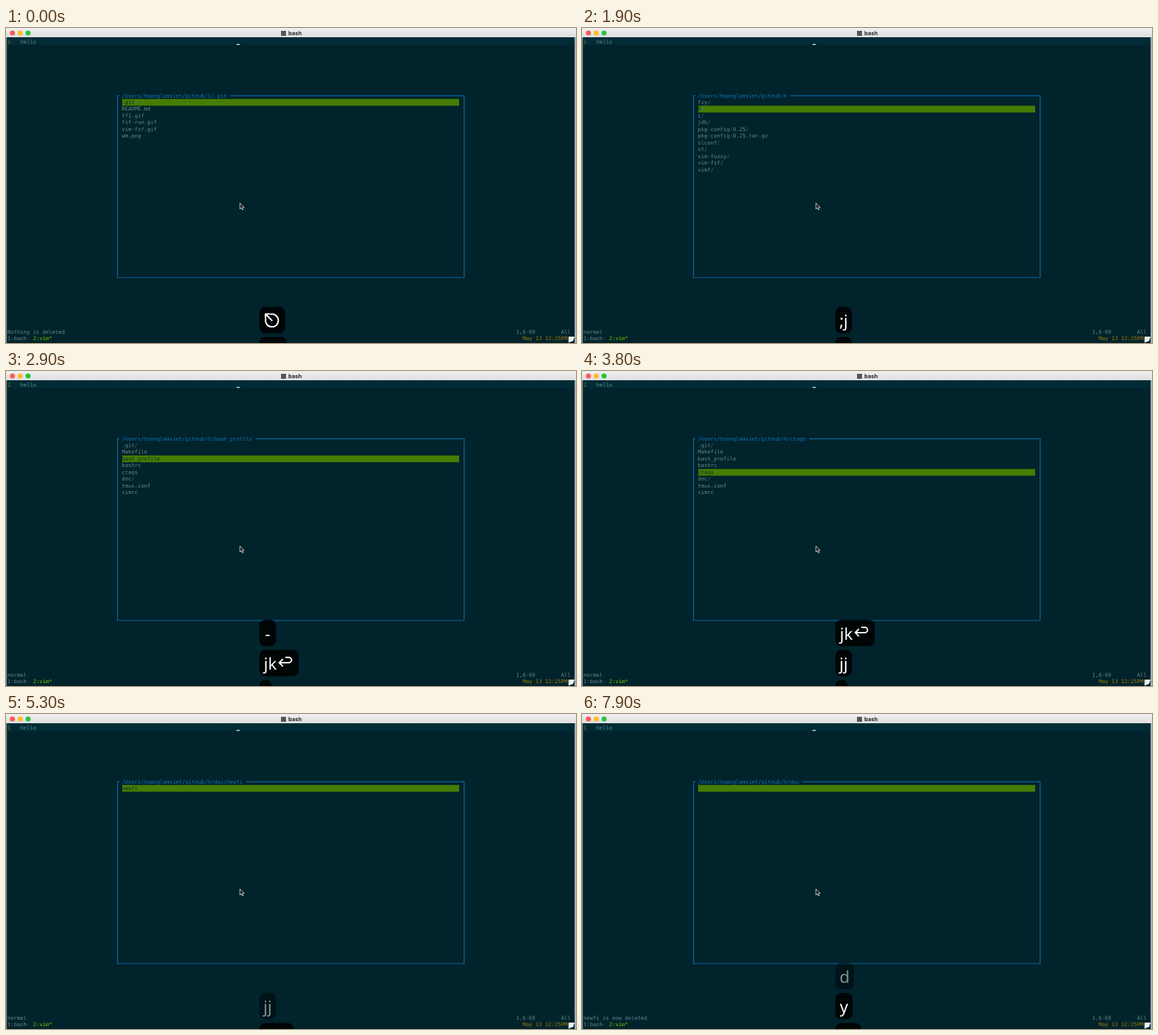
Animation of 800 by 443 pixels, one loop 8000 ms. Source, as an HTML page:

```html
<!DOCTYPE html>
<html lang="en">
<head>
<meta charset="utf-8">
<title>bash</title>
<style>
  html, body { margin: 0; width: 100%; height: 100%; overflow: hidden; background: #01232b; }
  svg { display: block; width: 800px; height: 443px; }
  text { text-rendering: geometricPrecision; white-space: pre; }
  .term text { font: 7.43px "DejaVu Sans Mono", monospace; fill: #6a878b; }
  .term .num { fill: #7d7d08; font-style: italic; }
  .term .tab { fill: #4f9a08; font-weight: bold; }
  .term .date { fill: #a47a08; }
  .term .path { fill: #0f74ba; }
  .term .on { fill: #08303a; }
  .dir { fill: #4d6a70; }
  .on .dir { fill: #2a86c8; }
  .frame { fill: none; stroke: #0b69a8; stroke-width: 1.2; }
  .name { font: bold 7.8px Inter, sans-serif; fill: #222; }
  .key text { font: 23px "Noto Sans", sans-serif; fill: #fff; }
  .key path { fill: none; stroke: #fff; stroke-width: 2; stroke-linejoin: round; stroke-linecap: round; }
</style>
</head>
<body>
<svg viewBox="0 0 800 443">
  <defs>
    <linearGradient id="bar" x2="0" y2="1">
      <stop stop-color="#f0f0f0"/><stop offset="1" stop-color="#dedede"/>
    </linearGradient>
  </defs>
  <rect width="800" height="443" fill="#01232b"/>
  <rect y="13" width="800" height="11" fill="#012c37"/>
  <rect width="800" height="13" fill="url(#bar)"/>
  <circle cx="9" cy="7" r="3.6" fill="#fc5b54"/>
  <circle cx="20" cy="7" r="3.6" fill="#fdbb2d"/>
  <circle cx="31" cy="7" r="3.6" fill="#27c53f"/>
  <rect x="386" y="4" width="7" height="7" fill="#555"/>
  <text class="name" x="396.3" y="10">bash</text>
  <rect y="13" width="1.2" height="430" fill="#7f9296"/>
  <rect x="798" y="13" width="2" height="430" fill="#a3aeb0"/>

  <g class="term">
    <text class="num" x="2" y="21.6">1</text>
    <text x="20" y="21.6">hello</text>
    <rect x="323.5" y="22.5" width="4.5" height="1.3" fill="#dfe8e8"/>
    <path class="frame" id="frame"/>
    <rect x="163" y="0" width="473" height="9.5" fill="#457c02" id="bar2"/>
    <text class="path" id="path" x="162.4" y="97.6"></text>
    <g id="list"></g>
    <text id="msg" x="2" y="429.6"></text>
    <text x="716" y="429.6">1,6-69</text>
    <text x="779" y="429.6">All</text>
    <text x="2" y="439.1">1:bash-</text>
    <text class="tab" x="38" y="439.1">2:vim*</text>
    <text class="date" x="725.3" y="439.1">May 13 12:25PM</text>
  </g>
  <path d="M789.5 434h8.5l-2 6-6.5 2.5z" fill="#eef1f1"/>
  <path d="M328.3 246v8.6l2-1.8 1.4 3 1.3-.6-1.3-2.9h2.6z" fill="#111" stroke="#e8eeee" stroke-width=".8"/>
  <g id="keys"></g>
</svg>
<script>
const LOOP = 8000, TICK = 100, CELL = 4.473, ROW = 9.49, LIST_TOP = 99.8;
const HOME = '/Users/hoanglamviet/github/';
const DIRS = {
  'i/': ['.git/', 'README.md', 'ff1.gif', 'fzf-run.gif', 'vim-fzf.gif', 'wm.png'],
  '': ['fzy/', 'h/', 'i/', 'jdb/', 'pkg-config-0.25/', 'pkg-config-0.25.tar.gz',
       'slconf/', 'st/', 'vim-fuzzy/', 'vim-fzf/', 'vimf/'],
  'h/': ['.git/', 'Makefile', 'bash_profile', 'bashrc', 'ctags', 'doc/', 'tmux.conf', 'vimrc'],
  'h/doc/': ['newfi'],
  'h/doc': []
};
// start, directory, selected row, message
const SCENES = [
  [0, 'i/', 0, 'Nothing is deleted'],
  [400, 'i/', 1, 'normal'],
  [1500, '', 1, 'normal'],
  [2000, '', 2, 'normal'],
  [2200, '', 1, 'normal'],
  [2300, 'h/', 0, 'normal'],
  [2400, 'h/', 1, 'normal'],
  [2900, 'h/', 2, 'normal'],
  [3200, 'h/', 3, 'normal'],
  [3700, 'h/', 4, 'normal'],
  [4000, 'h/', 5, 'normal'],
  [4300, 'h/doc/', 0, 'normal'],
  [7300, 'h/doc', 0, 'newfi is now deleted']
];
// from: pressed at; up: times it is pushed up a row; fade: start and length;
// grow: time the pill reaches full width from a single key
const KEYS = [
  { label: 'esc', w: 36, from: -200, row: 1, up: [100], fade: [500, 200] },
  { label: 'oe', w: 38.5, from: -200, up: [100], fade: [900, 300] },
  { label: ';j', w: 23, from: 100, up: [1500, 2000], fade: [2100, 200] },
  { label: '-', w: 23, from: 1500, up: [2000, 2300], fade: [3000, 400] },
  { label: 'jk↵', w: 55, from: 2000, up: [2300, 3600], fade: [3900, 200] },
  { label: 'jj', w: 23, from: 2300, up: [3600], fade: [5200, 200], grow: 3000 },
  { label: 'jj↵', w: 48, from: 3600, up: [5900], fade: [6200, 600], grow: 4300 },
  { label: 'd', w: 26, from: 5900, up: [7250, 7250], fade: [7800, 200] },
  { label: 'y', w: 24, from: 7250, up: [7250], fade: [9000, 200] },
  { label: 'esc', w: 36, from: 7250, up: [], fade: [9000, 200] }
];

const $ = id => document.getElementById(id);
const clamp = v => Math.max(0, Math.min(1, v));

function make(parent, tag, attrs, text = '') {
  const el = document.createElementNS('http://www.w3.org/2000/svg', tag);
  for (const k in attrs) el.setAttribute(k, attrs[k]);
  el.textContent = text;
  return parent.appendChild(el);
}

for (const key of KEYS) {
  key.el = make($('keys'), 'g', { class: 'key' });
  key.box = make(key.el, 'rect', { width: key.w, height: 37, rx: 8, fill: '#000', 'fill-opacity': .86 });
  if (key.label === 'esc') {
    make(key.el, 'path', { d: 'M16 10.2A9 9 0 1 1 8.8 17M17.5 19L8.5 10M8.5 15.5V10H14' });
    continue;
  }
  const enter = key.label.endsWith('↵');
  const text = enter ? key.label.slice(0, -1) : key.label;
  const mid = enter ? (key.w - 23) / 2 - .8 : key.w / 2;
  make(key.el, 'text', { x: mid, y: 27.7, 'text-anchor': 'middle' }, text);
  if (enter) make(key.el, 'path', {
    d: 'M37 10.5h4.3a3.7 3.7 0 0 1 0 7.4H28M32.5 13.2L27.7 17.9l4.8 4.7',
    transform: `translate(${key.w - 55})`
  });
}

let shown = null;
function showScene(scene) {
  if (scene === shown) return;
  shown = scene;
  const [, dir, sel, msg] = scene, names = DIRS[dir];
  const path = HOME + dir + (names[sel] || '').replace('/', '');
  const gap = 162.4 + (path.length + 1) * CELL;
  $('path').textContent = path;
  $('msg').textContent = msg;
  $('frame').setAttribute('d', `M159 95.3H156.5V351H643V95.3H${gap}`);
  $('bar2').setAttribute('y', LIST_TOP + sel * ROW);
  $('list').textContent = '';
  names.forEach((name, i) => {
    const isDir = name.endsWith('/');
    const line = make($('list'), 'text',
      { x: 162.6, y: LIST_TOP + i * ROW + 7.2, class: i === sel ? 'on' : '' },
      isDir ? name.slice(0, -1) : name);
    if (isDir) make(line, 'tspan', { class: 'dir' }, '/');
  });
}

function showKey(key, t) {
  const ease = p => 1 - (1 - p) ** 2;
  const row = key.up.reduce((r, at) => r + ease(clamp((t - at) / 150)), key.row || 0);
  const alpha = t < key.from ? 0 : 1 - clamp((t - key.fade[0]) / key.fade[1]);
  key.el.setAttribute('transform', `translate(355.7 ${434.6 - row * 42.3})`);
  key.el.setAttribute('opacity', alpha);
  key.box.setAttribute('width', t < key.grow ? 17 : key.w);
}

function draw(now) {
  const t = Math.floor(now % LOOP / TICK) * TICK;
  showScene(SCENES.findLast(s => s[0] <= t));
  for (const key of KEYS) showKey(key, t);
  requestAnimationFrame(draw);
}
draw(0);
</script>
</body>
</html>
```
